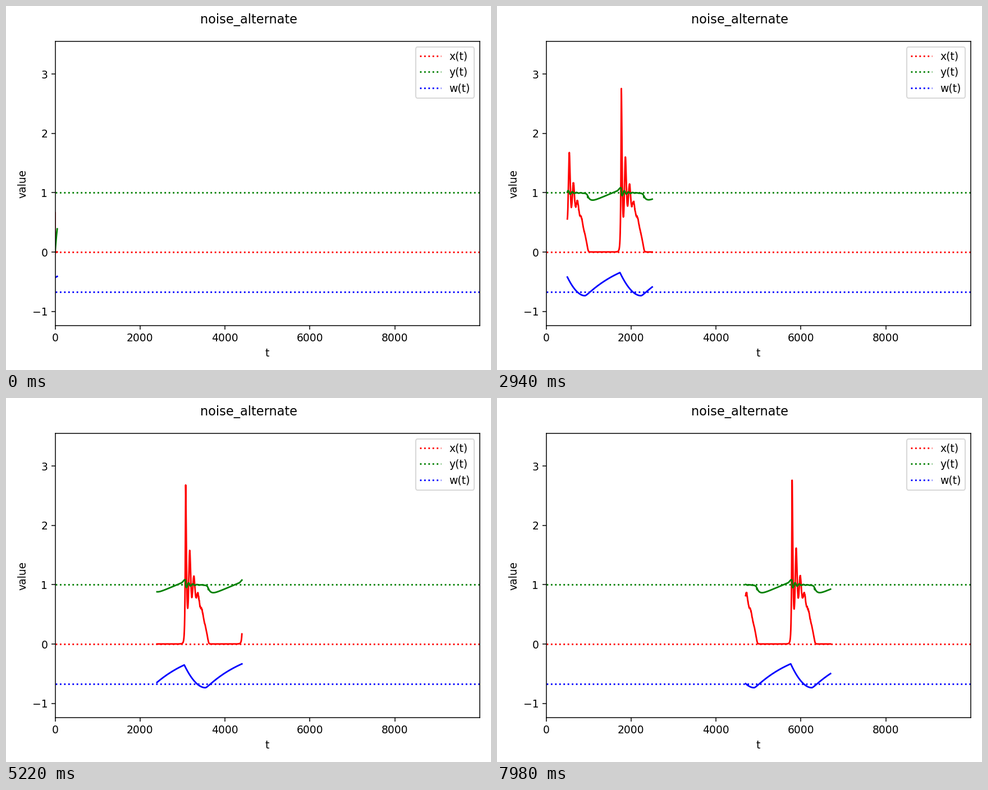
Write a matplotlib script that moves like this. It is 864 by 648 pixels and loops after 8 s.

```python
import numpy as np
import matplotlib.pyplot as plt
from matplotlib.animation import FuncAnimation

STEP, WINDOW = 50, 2000          # time units per update, length of the visible tail
PEAKS = np.array([450, 1772, 3075, 4434, 5794, 7150])
HEIGHTS = np.array([3.05, 2.755, 2.68, 2.725, 2.76, 2.75])
FADE = 534                       # peak to the moment x dies out
W_TOP, W_LOW = -33, 460          # turning points of w, relative to a peak
W_START, W_MIN, W_RATE = -.43, -.735, .00095


def locate(t, end):
    """Burst index, time from its peak, time since the previous burst's end."""
    i = np.searchsorted(PEAKS + end, t)
    since = np.where(i > 0, t - PEAKS[i - 1] - end, t)
    return i, t - PEAKS[i], since


def spikes(t):
    """Steep rise, then damped ringing around a parabolic decline."""
    i, u, since = locate(t, FADE)
    height = HEIGHTS[i]
    before, after = np.maximum(-u, 0), np.maximum(u, 0)
    rise = height * np.exp(-7.5 * (1 - np.exp(-(before / 65) ** 1.25)))
    ring = np.log(height / 1.1) * np.exp(-after / 120) * np.cos(np.pi * after / 49)
    fall = 1.1 * (1 - (after / 545) ** 2) * np.exp(ring)
    last = np.where(i > 0, .044 * np.exp(-since / 12), .66 * np.exp(-since))
    return np.where(u < 0, rise + last, fall)


def gain(t, x):
    """Log growth of x during a burst, a slow climb between bursts."""
    i, u, since = locate(t, FADE)
    active = 1 + np.gradient(np.log(x), t)
    climb = 1.06 + .0003 * u
    dip = (.94 - climb + .0003 * since) * np.exp(-since / 60)
    start = (1 + .00018 * t) * (1 - np.exp(-t / 100))
    return np.where(u > -100, active, np.where(i > 0, climb + dip, start))


def feedback(t):
    """Exponential recovery, then an eased fall after each spike."""
    i, u, since = locate(t, W_LOW)
    first = i == 0
    soft = np.where(first, 0, 35)
    recovery = np.hypot(since - np.maximum(u - W_TOP, 0), soft) - soft
    level = np.where(first, W_START, W_MIN) * np.exp(-W_RATE * recovery)
    s = np.clip((u - W_TOP) / (W_LOW - W_TOP), 0, 1)
    return W_MIN + (level - W_MIN) * (1 - s) ** 1.9


def jitter(t):
    """Smoothed noise that shows only on the late part of a burst."""
    noise = np.random.default_rng(4).normal(0, .03, len(t))
    _, u, _ = locate(t, FADE)
    return 1 + np.convolve(noise, np.ones(9) / 9, "same") * np.clip(u / 300, 0, 1)


time = np.arange(0, 6801.0)
x = spikes(time)
series = (x * jitter(time), gain(time, x), feedback(time))
colors = ("red", "green", "blue")

fig, ax = plt.subplots(figsize=(6.4, 4.8), dpi=135)
fig.suptitle("noise_alternate")
ax.set(xlim=(0, 9999), ylim=(-1.2405, 3.5447), xlabel="t", ylabel="value")

for level, name, color in zip((0, 1, -.675), "xyw", colors):
    ax.axhline(level, linestyle=":", color=color, label=f"{name}(t)")
lines = [ax.plot([], [], color=color)[0] for color in colors]
ax.set(xticks=range(0, 8001, 2000), yticks=range(-1, 4))
ax.legend(loc="upper right")
fig.tight_layout()


def update(i):
    end = STEP * (i // 3 + 1)
    part = slice(max(0, end - WINDOW), end)
    for line, values in zip(lines, series):
        line.set_data(time[part], values[part])
    return lines


anim = FuncAnimation(fig, update, frames=400, interval=20, repeat=True,
                     repeat_delay=0, init_func=lambda: update(0), blit=False)
plt.show()
```
